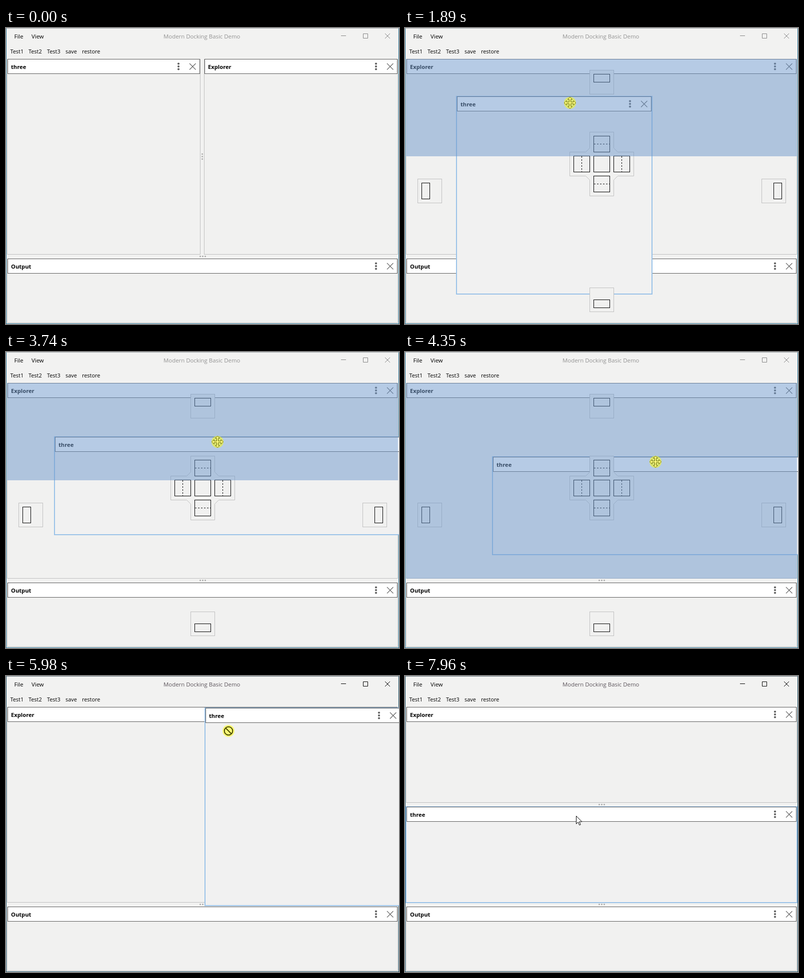
Recreate the animation shown at these times as an HTML page. Size 786 by 593 pixels, loop 8 s.

```html
<!DOCTYPE html>
<html lang="en">
<head>
<meta charset="utf-8">
<title>Docking demo</title>
<style>
  html, body { margin: 0; width: 100%; height: 100%; overflow: hidden; background: #f2f2f1; }
  svg { display: block; width: 100%; height: 100%; }
  text { font: 11.4px "Open Sans", "Noto Sans", sans-serif; white-space: pre; }
  .tool { font-size: 10.9px; }
  .head { font-size: 11.2px; font-weight: 700; }
</style>
</head>
<body>
<svg id="stage" viewBox="0 0 786 593"></svg>
<script>
const LOOP = 8000;
const stage = document.getElementById('stage');

// Panes are [name, left, top, right, bottom].
const output = ['Output', 2, 462, 784, 591];
const full = ['Explorer', 2, 62, 784, 454];
const layouts = [
  [['three', 2, 62, 389, 454], ['Explorer', 396, 62, 784, 454], output],
  [['three', 2, 62, 784, 254], ['Explorer', 2, 262, 784, 454], output],
  [['Explorer', 2, 62, 389, 454], ['three', 396, 62, 784, 454], output],
  [['Explorer', 2, 62, 784, 254], ['three', 2, 262, 784, 454], output]
];

// Each drag lifts "three" out of the layout with the same index.
const drags = [
  { press: 1430, lift: 1520, guides: 1570, shade: 1650, drop: 2700, settle: 2740, dx: 227, dy: 13 },
  { press: 3360, lift: 3400, guides: 3450, shade: 3480, drop: 4890, settle: 4930, dx: 326, dy: 10 },
  { press: 5910, lift: 5960, guides: 6010, shade: 6040, drop: 7030, settle: 7070, dx: 46, dy: 11 }
];

// Pointer path: time, x, y.
const path = [
  [0, 380, 610], [80, 378, 600], [690, 235, 146], [890, 235, 146], [1280, 230, 75],
  [1500, 230, 75], [1620, 238, 90], [1890, 330, 150], [2930, 330, 150], [3290, 330, 75],
  [3400, 330, 75], [3730, 420, 178], [4010, 500, 219], [4350, 501, 220], [4600, 532, 232],
  [5180, 532, 232], [5480, 416, 67], [5680, 416, 67], [5900, 444, 75], [5940, 444, 75],
  [5980, 445, 109], [6280, 377, 376], [7030, 377, 376], [7340, 367, 326], [7500, 367, 326],
  [7960, 342, 280], [8000, 342, 280]
];

function slope(i, k) {
  if (i < 0 || i >= path.length - 1) return 0;
  return (path[i + 1][k] - path[i][k]) / (path[i + 1][0] - path[i][0]);
}

function tangent(i, k) {
  const a = slope(i - 1, k), b = slope(i, k);
  return a * b > 0 ? 2 * a * b / (a + b) : 0;
}

// Monotone cubic, so that pauses stay still.
function along(t, k) {
  let i = 0;
  while (i < path.length - 2 && path[i + 1][0] <= t) i++;
  const h = path[i + 1][0] - path[i][0], u = (t - path[i][0]) / h;
  const s = u * u * (3 - 2 * u);
  return path[i][k] * (1 - s) + path[i + 1][k] * s
    + h * u * (1 - u) * ((1 - u) * tangent(i, k) - u * tangent(i + 1, k));
}

const rect = (x, y, w, h, fill, stroke = 'none', width = 1) =>
  `<rect x="${x}" y="${y}" width="${w}" height="${h}" fill="${fill}" stroke="${stroke}" stroke-width="${width}"/>`;
const line = (d, stroke, width = 1, extra = '') =>
  `<path d="${d}" fill="none" stroke="${stroke}" stroke-width="${width}" ${extra}/>`;
const dot = (x, y, r, fill) => `<circle cx="${x}" cy="${y}" r="${r}" fill="${fill}"/>`;
const label = (x, y, str, cls = '', fill = '#000') =>
  `<text x="${x}" y="${y}" class="${cls}" fill="${fill}">${str}</text>`;

function frame(active) {
  const ink = active ? '#000' : '#858585';
  const tools = [[8.5, 'Test1'], [45, 'Test2'], [82, 'Test3'], [119, 'save'], [152, 'restore']];
  return rect(0.5, 0.5, 785, 592, '#f2f2f1', active ? '#1d5068' : '#2d7a9c')
    + line('M0 .5H786', active ? '#63737b' : '#a3a9ac')
    + label(16.5, 21, 'File') + label(51, 21, 'View')
    + label(315, 21, 'Modern Docking Basic Demo', '', active ? '#5c555c' : '#929292')
    + tools.map(([x, s]) => label(x, 51, s, 'tool')).join('')
    + line('M670 15.5h10M714.5 11.5h9v9h-9zM758 11l10 10M768 11l-10 10', ink);
}

function pane([name, x0, y0, x1, y1], hover) {
  const w = x1 - x0, h = y1 - y0, y = y0 + 15;
  return (hover ? rect(x0, y0, w, h, '#f1f1f1', '#9ac2e8', 2)
                : rect(x0 + 0.5, y0 + 0.5, w - 1, h - 1, '#f1f1f0', '#bfbfbf'))
    + rect(x0 + 1.5, y0 + 0.5, w - 3, 29, '#fff', '#5a5a5a')
    + label(x0 + 8, y0 + 20, name, 'head')
    + [-5.5, 0, 5.5].map(d => dot(x1 - 44, y + d, 2.1, '#606060')).join('')
    + line(`M${x1 - 22} ${y - 6}l12.5 12.5m0 -12.5l-12.5 12.5`, '#606060', 1.1);
}

function grip(x, y, vertical) {
  return [-5, 0, 5].map(d =>
    vertical ? dot(x, y + d, 1.5, '#aaa') : dot(x + d, y, 1.5, '#aaa')).join('');
}

function grips(panes) {
  let s = grip(393.5, 457.5);
  if (panes.length > 2) s += panes[0][3] < 400 ? grip(392.5, 257.5, true) : grip(393.5, 257.5);
  return s;
}

function buildGuides() {
  const box = (x, y) => rect(x + 0.5, y + 0.5, 48, 48, '#f1f1f0', '#c0c0c0');
  const mark = (x, y, w, h) => rect(x + 0.5, y + 0.5, w, h, 'none', '#000');
  const cross = 'M369.5 208.5h48v32l8 8h32v48h-32l-8 8v32h-48v-32l-8-8h-32v-48h32l8-8z';
  const squares = [[377, 216], [377, 256], [377, 296], [337, 256], [417, 256]];
  return box(369, 84) + mark(377, 92, 32, 16)
    + box(369, 520) + mark(377, 544, 32, 16)
    + box(25, 302) + mark(33, 310, 16, 32)
    + box(713, 302) + mark(737, 310, 16, 32)
    + `<path d="${cross}" fill="#f1f1f0" stroke="#c0c0c0"/>`
    + squares.map(([x, y]) => mark(x, y, 32, 32)).join('')
    + line('M378 232.5h32M378 312.5h32M353.5 257v32M433.5 257v32', '#000', 1, 'stroke-dasharray="3 3"');
}
const guides = buildGuides();

// The outer thirds of the pane choose a half, the middle the whole.
function shade(x, y) {
  const fx = (x - 2) / 782, fy = (y - 62) / 392;
  let area = [2, 62, 782, 392];
  if (fy < 1 / 3) area = [2, 62, 782, 195];
  else if (fy > 2 / 3) area = [2, 257, 782, 195];
  else if (fx < 1 / 3) area = [2, 62, 391, 392];
  else if (fx > 2 / 3) area = [393, 62, 391, 392];
  return rect(...area, 'rgba(111,151,203,.5)');
}

const glow = dot(0, 0, 12, 'rgba(255,255,0,.5)');
const arrow = '<path d="M.5 .5V16.2l3.7-3.5 2.6 6 2.4-1-2.6-5.8H11.8z" fill="#fff" stroke="#000"/>';
const cursors = {
  arrow,
  press: glow + arrow,
  move: glow + '<path d="M0-11.5l4.5 4.5h-3v5.5h5.5v-3l4.5 4.5-4.5 4.5v-3h-5.5v5.5h3l-4.5 4.5-4.5-4.5h3v-5.5h-5.5v3l-4.5-4.5 4.5-4.5v3h5.5v-5.5h-3z" fill="#ffff80" stroke="#6a6a08"/>',
  deny: glow + '<g fill="none" stroke="#4a4a00" stroke-width="2"><circle r="8.3"/><path d="M-6-6L6 6"/></g>'
};

function render(t) {
  const x = Math.round(along(t, 1)), y = Math.round(along(t, 2));
  const done = drags.filter(d => t >= d.drop).length;
  const drag = drags.find(d => t >= d.press && t < d.drop);
  const lifted = drag && t >= drag.lift;
  const settling = drags.some(d => t >= d.drop && t < d.settle);
  const guided = drag && t >= drag.guides;
  const active = t >= drags[0].press && !guided && !settling;
  const panes = lifted ? [full, output] : layouts[done];
  const inside = p => x >= p[1] && x < p[3] && y >= p[2] && y < p[4];

  let s = frame(active) + grips(panes);
  s += panes.map(p => pane(p, !lifted && !settling && inside(p))).join('');
  if (lifted) {
    const [, x0, y0, x1, y1] = layouts[done].find(p => p[0] === 'three');
    const left = guided ? x - drag.dx : x0 + 2, top = guided ? y - drag.dy : y0 + 2;
    s += pane(['three', left, top, left + x1 - x0 + 4, top + y1 - y0 + 4], true);
    if (guided) s += guides;
    if (t >= drag.shade) s += shade(x, y);
  }
  const kind = guided ? 'move' : lifted ? 'deny' : drag ? 'press' : 'arrow';
  if (t >= 90) s += `<g transform="translate(${x} ${y})">${cursors[kind]}</g>`;
  stage.innerHTML = s;
}

const start = performance.now();
function tick() {
  render((performance.now() - start) % LOOP);
  requestAnimationFrame(tick);
}
tick();
</script>
</body>
</html>
```
